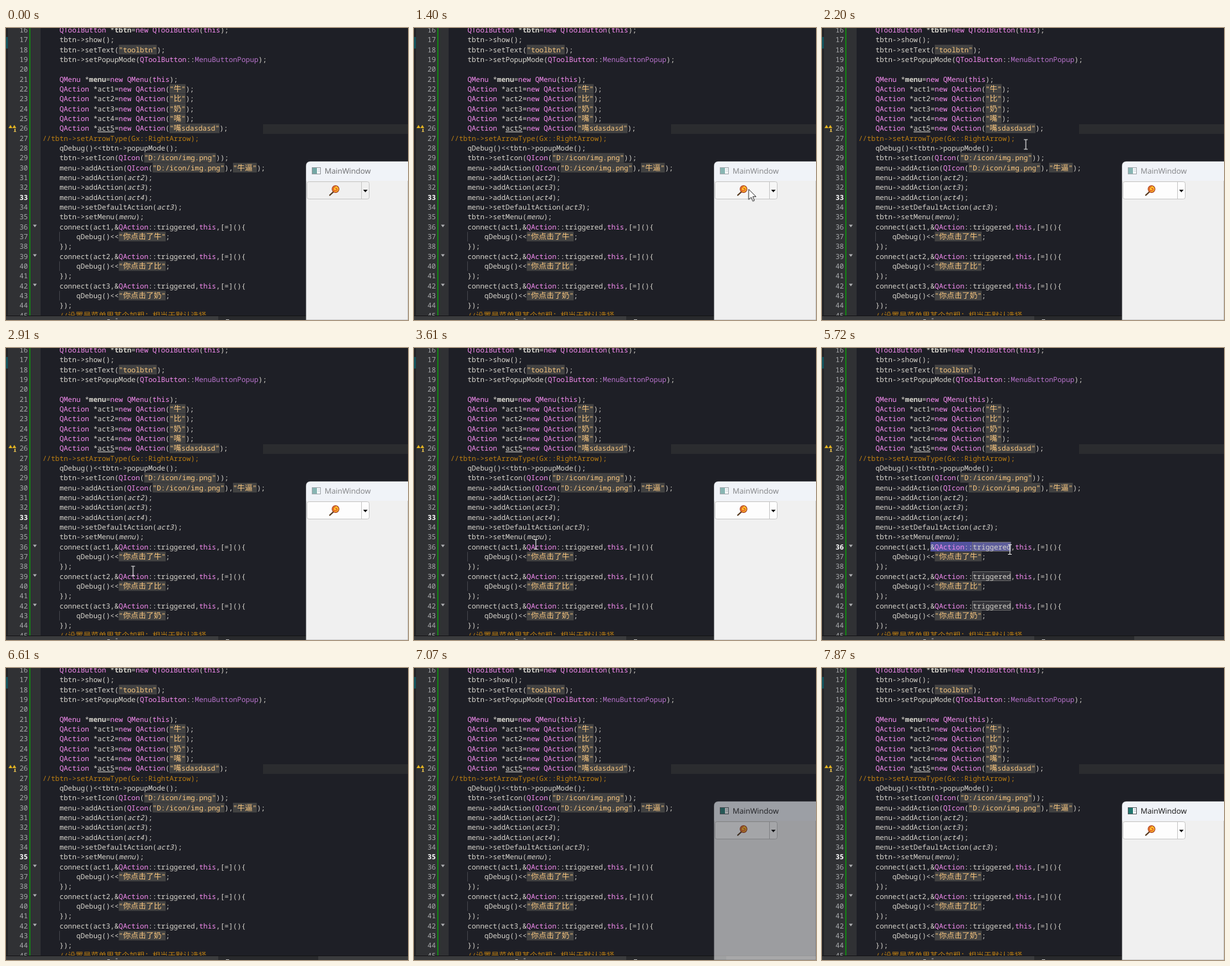
An HTML page for the animation above (8 s loop, 627x455 px).

```html
<!DOCTYPE html>
<html lang="en">
<head>
<meta charset="utf-8">
<title>Tool button menu</title>
<style>
  html, body { margin: 0; width: 100%; height: 100%; overflow: hidden; background: #1e1f26; }
  svg { display: block; width: 627px; height: 455px; }
  text { text-rendering: geometricPrecision; }
  #code, #nums { font: 11px "Noto Sans Mono", "DejaVu Sans Mono", monospace; fill: #d8d5cd; }
  #nums { fill: #a9abad; }
  .cjk { font-family: "Noto Sans CJK SC", "Noto Sans CJK", sans-serif; font-size: 12px; }
  .type, .key { fill: #f78df2; }
  .enum { fill: #b873cc; }
  .str { fill: #fbc880; }
  .note { fill: #bd7f12; }
  .arg { font-style: italic; }
  .decl { font-weight: bold; }
  .warn { text-decoration: underline #e0a020; }
  #title { font: 11.8px "Open Sans", "Noto Sans", sans-serif; }

  /* One loop is 8 s, so 1% is 80 ms. */
  .hold { animation: 8s step-end infinite; }
  .flow { animation: 8s linear infinite; }

  #win { animation-name: win; }
  @keyframes win {
    0%, 55.125% { opacity: 1; }
    55.6%, 88.3% { opacity: 0; }
    88.375% { opacity: .6; }
    89.1%, 100% { opacity: 1; }
  }
  #head { animation-name: head; }
  @keyframes head {
    0%, .5% { opacity: .6; }
    1.125%, 88.3% { opacity: .5; }
    88.4%, 100% { opacity: 1; }
  }
  #face { animation-name: face; }
  @keyframes face {
    0%, 16.9% { fill: #f0f0f0; }
    18.2%, 100% { fill: #fdfdfd; }
  }
  #n33 { animation-name: n33; }
  #n36 { animation-name: n36; }
  #n35 { animation-name: n35; }
  @keyframes n33 {
    0% { fill: #fff; font-weight: bold; }
    55.125%, 100% { fill: #a9abad; font-weight: normal; }
  }
  @keyframes n36 {
    0%, 75.5%, 100% { fill: #a9abad; font-weight: normal; }
    55.125% { fill: #fff; font-weight: bold; }
  }
  @keyframes n35 {
    0% { fill: #a9abad; font-weight: normal; }
    75.5%, 100% { fill: #fff; font-weight: bold; }
  }
  #sel { transform-origin: 169.2px 0; animation-name: sel; }
  @keyframes sel {
    0%, 75.5%, 100% { transform: scaleX(0); animation-timing-function: step-end; }
    55.625% { transform: scaleX(0); animation-timing-function: steps(18); }
    60.875% { transform: scaleX(.947); animation-timing-function: step-end; }
    64% { transform: scaleX(1); animation-timing-function: step-end; }
  }
  #marks { animation-name: marks; }
  @keyframes marks {
    0%, 75.6%, 100% { opacity: 0; }
    64.5% { opacity: 1; }
  }
  #caretA { animation-name: caretA; }
  @keyframes caretA {
    0%, 56.5%, 100% { opacity: 0; }
    55.125% { opacity: 1; }
  }
  #caretB { animation-name: caretB; }
  @keyframes caretB {
    0%, 82.6%, 100% { opacity: 0; }
    75.5% { opacity: 1; }
  }

  #beam { animation-name: beam; }
  @keyframes beam {
    0%, 79.4%, 96.2%, 100% { opacity: 0; }
    19.4%, 93.125% { opacity: 1; }
  }
  #arrow { animation-name: arrow; }
  @keyframes arrow {
    0%, 19.4%, 98.3%, 100% { opacity: 0; }
    12.875%, 96.2% { opacity: 1; }
  }
  #mouse { animation-name: mouse; }
  @keyframes mouse {
    0%, 12.875% { transform: translate(560px, 412px); }
    16.875% { transform: translate(540px, 250px); }
    22.875%, 23.5% { transform: translate(370px, 262px); }
    27.5% { transform: translate(318px, 181px); }
    32.75%, 34% { transform: translate(255px, 343px); }
    38.75% { transform: translate(142px, 352px); }
    41.25% { transform: translate(138px, 322px); }
    44%, 45.2% { transform: translate(190px, 306px); }
    48.125%, 51.5% { transform: translate(171px, 309px); }
    51.625%, 55.7% { transform: translate(169px, 309px); }
    60.875%, 63.875% { transform: translate(288px, 309px); }
    65%, 66.75% { transform: translate(298px, 310px); }
    68%, 71.55% { transform: translate(293px, 314px); }
    74.5% { transform: translate(411px, 296px); }
    76.125%, 77.875% { transform: translate(394px, 292px); }
    79%, 79.4% { transform: translate(443px, 346px); }
    79.5%, 93.125% { transform: translate(246px, 444px); }
    95% { transform: translate(340px, 367px); }
    96.25% { transform: translate(470px, 380px); }
    98%, 100% { transform: translate(622px, 432px); }
  }
</style>
</head>
<body>
<svg viewBox="0 0 627 455">
  <defs>
    <clipPath id="page"><rect width="627" height="448"/></clipPath>
  </defs>
  <rect width="627" height="455" fill="#1e1f26"/>
  <rect x="401" y="150" width="226" height="15" fill="#2b2c2f"/>
  <rect width="54" height="448" fill="#303134"/>
  <rect width="3" height="448" fill="#222326"/>
  <rect y="14" width="3" height="18" fill="#12525c"/>
  <rect x="36.5" width="1.5" height="448" fill="#0c9a0c"/>

  <g fill="#e3b320">
    <path d="M4 156l3-5 3 5zM10 156l3-5 3 5z"/>
    <path d="M13 157h2v4h1v1h-4v-1h1z" fill="#c9a94a"/>
  </g>

  <g clip-path="url(#page)">
    <g id="nums"></g>
    <g id="folds" fill="#b0b2b4"></g>
    <g id="guides" fill="#44454b"></g>
    <g id="boxes" fill="#424242"></g>
    <rect id="sel" class="hold" x="169.2" y="302" width="125.4" height="15" fill="#53539f"/>
    <g id="marks" class="hold" fill="#8a8a8a" fill-opacity=".2" stroke="#707070"></g>
    <g id="code"></g>
    <rect id="caretA" class="hold" x="168.5" y="302" width="1.5" height="15" fill="#eee"/>
    <rect id="caretB" class="hold" x="215" y="287" width="1.5" height="14" fill="#eee"/>
  </g>

  <rect y="448" width="627" height="7" fill="#3a3b3d"/>
  <rect y="448" width="627" height="1" fill="#141416"/>
  <rect x="331" y="449" width="156" height="6" fill="#28292c"/>
  <path d="M158 454.5h4M171 453h3M343 454.5h5" stroke="#b5b5b5"/>

  <g id="win" class="flow">
    <path d="M468 455V215q0-7 7-7h152v247z" fill="#f0f0f0" stroke="#85868a" stroke-width=".6"/>
    <path d="M468.3 238V215q0-6.700 6.700-6.700h152V238z" fill="#f0f3f8"/>
    <g id="head" class="flow">
      <rect x="477.500" y="217.500" width="13" height="10" fill="#fff" stroke="#555b60"/>
      <rect x="478" y="218" width="7" height="9" fill="#21766f"/>
      <path d="M486.500 220h3M486.500 223h3" stroke="#9ab"/>
      <text id="title" x="497" y="227" fill="#111">MainWindow</text>
    </g>
    <rect id="face" class="flow" x="469.500" y="239.500" width="97" height="27" rx="3" stroke="#c6c6c6"/>
    <path d="M554.500 240v26" stroke="#c6c6c6"/>
    <path d="M557 252h7l-3.500 4z" fill="#111"/>
    <path d="M511 255l-6 5.500" stroke="#54381c" stroke-width="2" stroke-linecap="round"/>
    <circle cx="514" cy="251" r="5.300" fill="#ffc928" stroke="#a8371f" stroke-width="1.200"/>
    <path d="M514 251q1-2 2.200 0t-2.200 2.500-3.500-2.500 3.500-3.600" fill="none" stroke="#e0492a" stroke-width="1.300"/>
  </g>

  <g id="mouse" class="flow">
    <path id="beam" class="hold" d="M-3-7.500h2.500q.5 0 .5.500v14q0 .5-.5.500H-3M3-7.500H.5Q0-7.500 0-7M3 7.500H.5Q0 7.500 0 7" fill="none" stroke="#e6e6e6" stroke-width="1.200"/>
    <path id="arrow" class="hold" d="M0 0v16l4-3.500 2.500 6 2.500-1-2.500-6h5z" fill="#fff" stroke="#111" stroke-width=".9"/>
  </g>
</svg>
<script>
  const SOURCE = `
    QToolButton *tbtn=new QToolButton(this);
    tbtn->show();
    tbtn->setText("toolbtn");
    tbtn->setPopupMode(QToolButton::MenuButtonPopup);

    QMenu *menu=new QMenu(this);
    QAction *act1=new QAction("牛");
    QAction *act2=new QAction("比");
    QAction *act3=new QAction("奶");
    QAction *act4=new QAction("嘴");
    QAction *act5=new QAction("嘴sdasdasd");
//tbtn->setArrowType(Gx::RightArrow);
    qDebug()<<tbtn->popupMode();
    tbtn->setIcon(QIcon("D:/icon/img.png"));
    menu->addAction(QIcon("D:/icon/img.png"),"牛逼");
    menu->addAction(act2);
    menu->addAction(act3);
    menu->addAction(act4);
    menu->setDefaultAction(act3);
    tbtn->setMenu(menu);
    connect(act1,&QAction::triggered,this,[=](){
        qDebug()<<"你点击了牛";
    });
    connect(act2,&QAction::triggered,this,[=](){
        qDebug()<<"你点击了比";
    });
    connect(act3,&QAction::triggered,this,[=](){
        qDebug()<<"你点击了奶";
    });
    //设置是菜单里某个加粗：相当于默认选择`.slice(1).split("\n");

  const FIRST = 16, LEFT = 57, CELL = 6.6, WIDE = 12, PITCH = 15.33;
  const RULES = [
    ["str", /"[^"]*"/],
    ["note", /\/\/.*/],
    ["key", /\b(?:new|this)\b/],
    ["type", /\bQ[A-Z]\w*/],
    ["enum", /MenuButtonPopup/],
    ["arg", /(?:act\d|menu)(?=\);)/],
    ["decl", /(?<=\*)(?:tbtn|menu)/],
    ["warn", /act5/],
    ["", /\w+|[^\w\s]/]
  ];
  const TOKEN = new RegExp(RULES.map(r => `(${r[1].source})`).join("|"), "g");
  const isWide = c => c >= "\u2e80";
  const span = s => [...s].reduce((w, c) => w + (isWide(c) ? WIDE : CELL), 0);
  const middle = n => 3 + (n - FIRST) * PITCH;

  function add(parent, tag, attrs, content) {
    const el = document.createElementNS("http://www.w3.org/2000/svg", tag);
    for (const k in attrs) el.setAttribute(k, attrs[k]);
    if (content) el.textContent = content;
    document.getElementById(parent).append(el);
  }

  function drawLine(line, n) {
    const mid = middle(n), y = mid + 4;
    const hot = [33, 35, 36].includes(n);
    add("nums", "text", { x: 21, y, id: "n" + n, class: hot ? "hold" : "" }, String(n));
    for (const m of line.matchAll(TOKEN)) {
      const kind = RULES[m.slice(1).findIndex(g => g !== undefined)][0];
      let x = LEFT + span(line.slice(0, m.index));
      if (kind === "str")
        add("boxes", "rect", { x, y: mid - 7.5, width: span(m[0]), height: 15 });
      for (const run of m[0].match(/[\u2e80-\uffff]+|[^\u2e80-\uffff]+/g)) {
        add("code", "text", { x, y, class: kind + (isWide(run[0]) ? " cjk" : "") }, run);
        x += span(run);
      }
    }
    if (line.includes("connect(")) {
      add("folds", "path", { d: `M42 ${mid - 3}h6l-3 4z` });
      add("guides", "rect", { x: 83, y: mid + 8, width: 1, height: 15 });
      const at = LEFT + span(line.slice(0, line.indexOf("triggered")));
      add("marks", "rect", { x: at - .5, y: mid - 7, width: 9 * CELL, height: 14 });
    }
  }

  SOURCE.forEach((line, i) => drawLine(line, FIRST + i));
</script>
</body>
</html>
```
